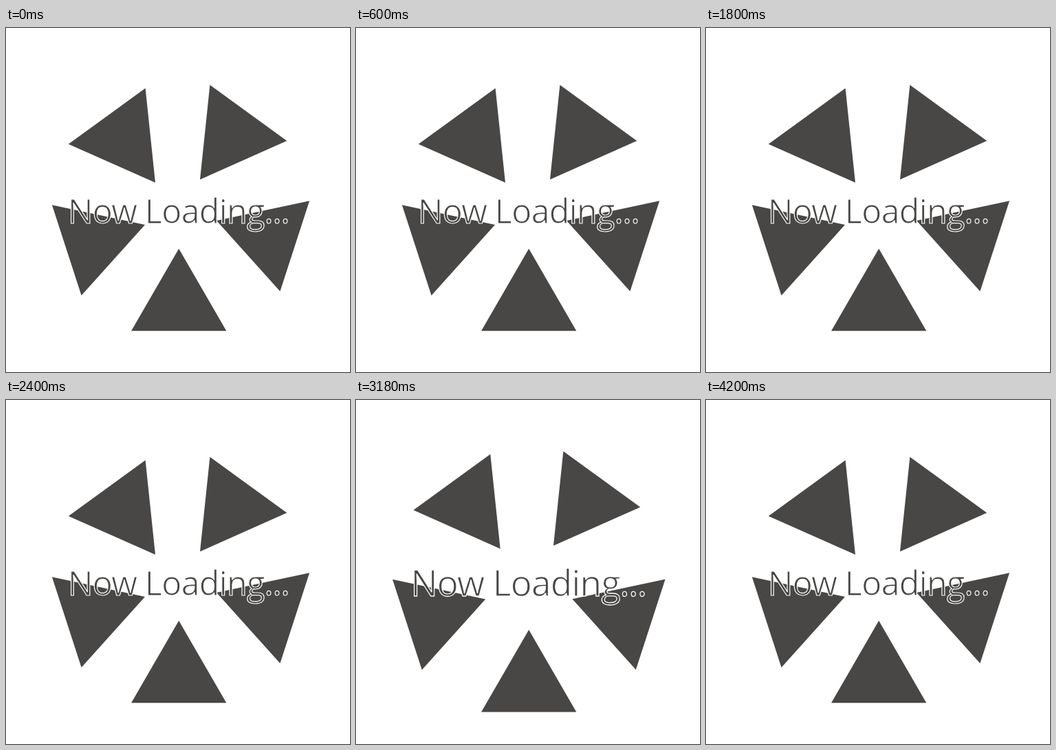
An HTML page for the animation above (4500 ms loop, 500x500 px).

```html
<!DOCTYPE html>
<html lang="en">
<head>
<meta charset="utf-8">
<title>Now Loading</title>
<style>
  html, body { margin: 0; height: 100%; overflow: hidden; background: #fff; }
  svg { display: block; width: 100%; height: 100%; fill: #484745; }
  text {
    font: 400 49px "Open Sans", "Noto Sans", sans-serif;
    letter-spacing: -1.1px;
    text-anchor: middle;
    stroke: #fff;
    stroke-width: 1.2px;
  }
</style>
</head>
<body>
<svg viewBox="0 0 500 500">
  <g id="blades"></g>
  <text id="label" y="11">Now Loading...</text>
</svg>
<script>
const STEP = 30, LOOP = 4500, ACTIVE = 4200, BEAT = 600;

// Inner tip x, y, rotation and the drift at full spread
const blades = [
  [251.2, 320.7, 0, 0, 22],
  [202, 286, 72, -23, 6],
  [217, 224.8, 144, -12.2, -14.3],
  [282, 220.2, 216, 8.3, -14],
  [306, 280, 288, 14, 15.5]
].map(([x, y, angle, dx, dy]) => {
  const el = document.createElementNS("http://www.w3.org/2000/svg", "path");
  el.setAttribute("d", "M0 0L69.1 119.6H-69.1Z");
  document.getElementById("blades").append(el);
  return { el, x, y, angle, dx, dy };
});
const label = document.getElementById("label");

function draw(ms) {
  const t = Math.floor(ms % LOOP / STEP) * STEP;
  const phase = t < ACTIVE ? t % BEAT / BEAT : 0;
  const spread = 1 - Math.abs(1 - 2 * phase);
  for (const { el, x, y, angle, dx, dy } of blades) {
    el.setAttribute("transform",
      `translate(${x + dx * spread} ${y + dy * spread}) rotate(${angle})`);
  }
  label.setAttribute("transform", `translate(250.5 273) scale(${1 + 0.107 * spread})`);
}

const start = performance.now();
function tick() {
  draw(performance.now() - start);
  requestAnimationFrame(tick);
}
tick();
</script>
</body>
</html>
```
